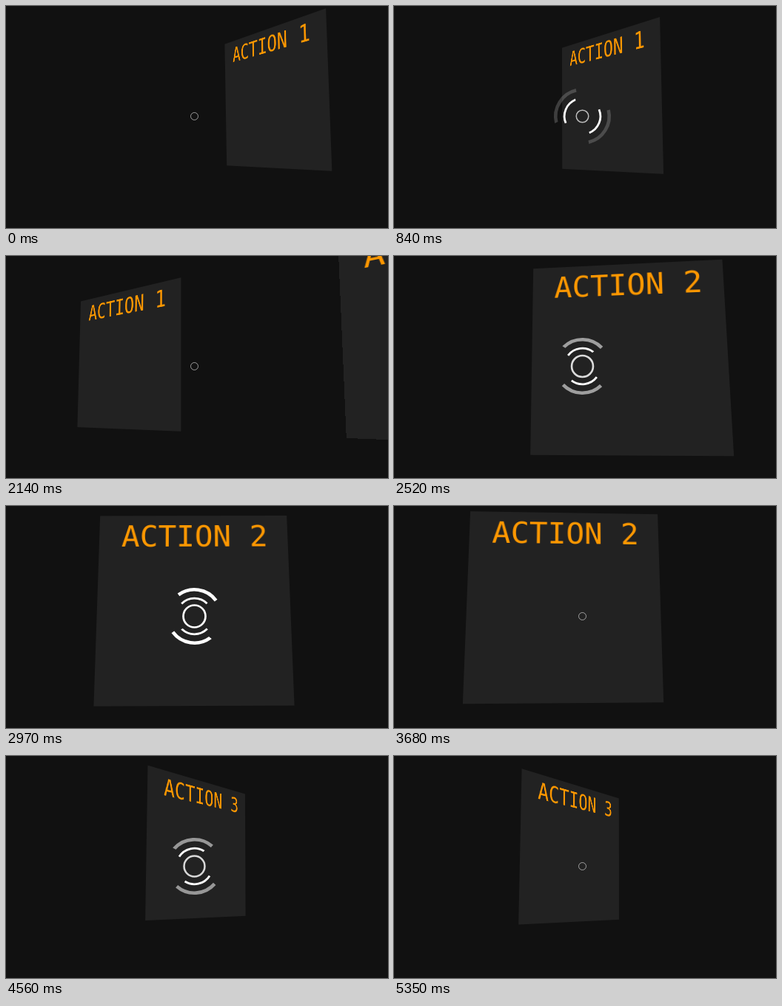
Write an HTML page that moves like this. It is 516x301 px and loops after 6070 ms.

```html
<!DOCTYPE html>
<html lang="en">
<head>
<meta charset="utf-8">
<title>Gaze menu</title>
<style>
  html, body { margin: 0; width: 100%; height: 100%; overflow: hidden; background: #111; }
  #stage {
    position: relative; width: 516px; height: 301px; overflow: hidden; background: #111;
    perspective: 530px; perspective-origin: 254.5px 149.5px;
  }
  #world { position: absolute; left: 254.5px; top: 149.5px; width: 0; height: 0; }
  #world, .panel { transform-style: preserve-3d; }
  .panel {
    position: absolute; left: -132.5px; top: -225.25px; width: 265px; height: 265px;
    background: #222; color: #ff9800;
    font: 42.4px/49.4px "DejaVu Sans Mono", monospace; text-align: center; white-space: pre;
  }
  /* The label floats slightly in front of its panel */
  .label { position: absolute; top: 8px; width: 100%; transform: translate3d(2px, 0, 5px); }
  svg { position: absolute; left: 0; top: 0; fill: none; stroke: #fff; }
</style>
</head>
<body>
<div id="stage">
  <div id="world"></div>
  <svg width="516" height="301">
    <g transform="translate(254.5 149.5)">
      <circle id="dot"/>
      <circle id="inner" r="24.3" stroke-width="2.8" pathLength="4" stroke-dasharray="1 1"/>
      <circle id="outer" r="36.2" stroke-width="4.6" pathLength="4" stroke-dasharray="1 1"/>
    </g>
  </svg>
</div>
<script>
const LOOP = 6070, FIRST_TICK = 472, TICK = 88.5;
const DISTANCE = 530, SPIN_TICKS = 9.6, GAZE_TICKS = 11.2;

const $ = id => document.getElementById(id);
const clamp = (v, lo = 0, hi = 1) => Math.min(hi, Math.max(lo, v));

// Easings over the ticks since a move began
const smooth = t => { const u = clamp(t / 8.9); return u * u * (3 - 2 * u); };
const spring = rate => t => { const x = Math.max(0, t * rate); return 1 - Math.exp(-x) * (1 + x); };

// Head movements, each adding its turn to the starting pose
const rest = { yaw: -55.9, pitch: 4.48, roll: .6 };
const moves = [
  { start: -1.1, ease: smooth, yaw: 12.45, pitch: .7, roll: -.4 },
  { start: 16.3, ease: spring(.473), yaw: 44.8, pitch: 4, roll: 0 },
  { start: 23, ease: smooth, yaw: 0, pitch: -.9, roll: 0 },
  { start: 35.36, ease: spring(.427), yaw: 45.3, pitch: -4.1, roll: -.6 },
  { start: 46, ease: smooth, yaw: -.5, pitch: .8, roll: 0 }
];

// Ticks at which the gaze settles on each panel
const gazeStarts = [3.16, 20.57, 43.7];

for (let n = 1; n <= 3; n++) {
  const x = (n - 2) * DISTANCE;
  $("world").innerHTML += `<div class="panel" style="transform: translate3d(${x}px, 0, ${-DISTANCE}px)">
    <div class="label">ACTION ${n}</div></div>`;
}

function turnCamera(tick) {
  const angle = axis => moves.reduce((sum, m) => sum + m[axis] * m.ease(tick - m.start), rest[axis]);
  $("world").style.transform = `translateZ(${DISTANCE}px) rotateZ(${-angle("roll")}deg)
    rotateX(${angle("pitch")}deg) rotateY(${angle("yaw")}deg)`;
}

function drawArc(id, angle, opacity) {
  $(id).setAttribute("transform", `rotate(${angle - 45})`);
  $(id).setAttribute("opacity", opacity);
}

function drawCursor(tick) {
  const start = gazeStarts.find(s => tick >= s && tick < s + GAZE_TICKS);
  const age = start === undefined ? 0 : tick - start;
  const fade = clamp((GAZE_TICKS - age) / (GAZE_TICKS - SPIN_TICKS));
  const radius = 5 + Math.min(10, 3.9 * age) * fade;
  const angle = 360 * clamp(age / SPIN_TICKS);

  $("dot").setAttribute("r", radius);
  $("dot").setAttribute("stroke-width", radius * .18);
  $("dot").setAttribute("opacity", .62 + clamp(.09 * age, 0, .38) * fade);
  drawArc("inner", angle - 9, clamp(age * 1.2) * fade);
  drawArc("outer", angle, clamp(age * .23) * fade);
}

function render() {
  // The view refreshes in discrete ticks
  const tick = Math.floor((performance.now() % LOOP - FIRST_TICK) / TICK);
  turnCamera(Math.max(tick, -1));
  drawCursor(tick);
  requestAnimationFrame(render);
}
render();
</script>
</body>
</html>
```
